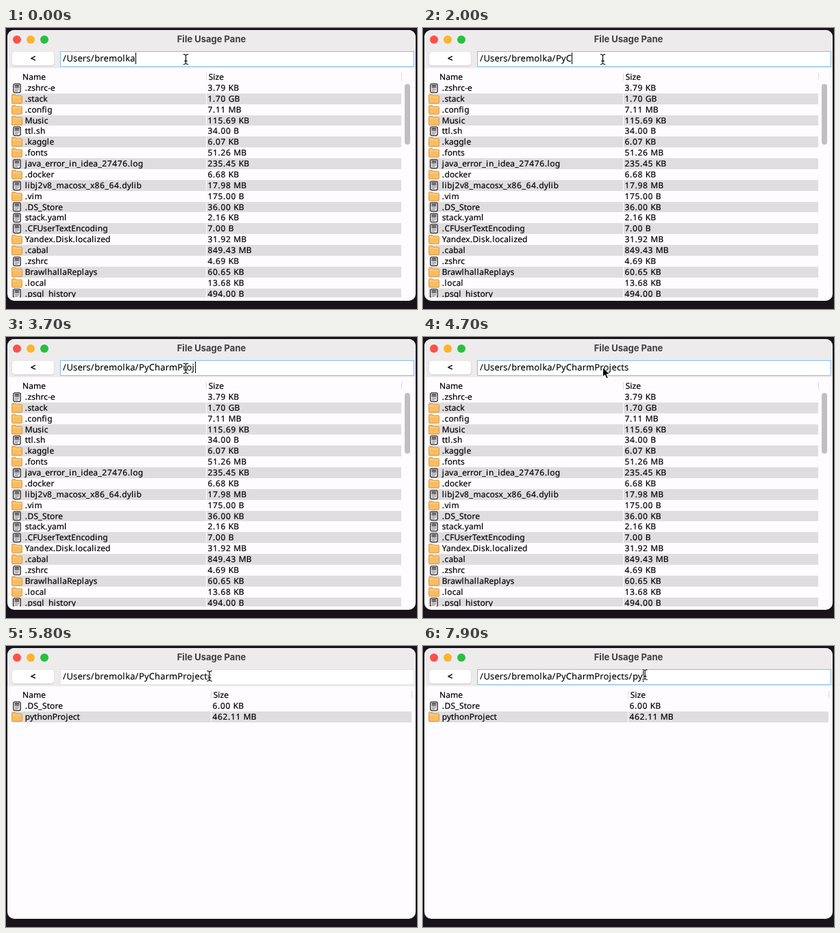
Write an HTML page that moves like this. It is 600 px wide and 412 px high and loops after 8 s.

```html
<!DOCTYPE html>
<html lang="en">
<head>
<meta charset="utf-8">
<title>File Usage Pane</title>
<style>
  html, body { margin: 0; width: 100%; height: 100%; overflow: hidden; background: #19141a; }
  #stage { position: relative; width: 600px; height: 412px; overflow: hidden; }
  #stage * { box-sizing: border-box; }
  #stage div, #stage svg { position: absolute; }
  .win { left: 2px; top: 3px; width: 596px; height: 397px; border-radius: 10px; background: #fefcfe; overflow: hidden; }
  .bar { left: 0; top: 0; width: 596px; height: 56px; background: #eeebed; }
  .title { left: 2px; width: 596px; top: 6px; text-align: center; color: #403d40;
    font: 700 13px/21px Inter, sans-serif; }
  .light { width: 12px; height: 12px; top: 10.5px; border-radius: 50%; }
  .back { left: 9px; top: 35px; width: 61px; height: 20px; border-radius: 4px; background: #fff;
    box-shadow: 0 .5px 1.5px #aaa7aa; text-align: center; }
  .back, .row, .head { font: 12px/15.87px "Noto Sans", sans-serif; }
  .back { line-height: 19px; font-size: 13px; -webkit-text-stroke: .5px #000; }
  .field { left: 79px; top: 34px; width: 517px; height: 23px; padding-left: 3px; background: #fff;
    border: 1px solid #e3e0e3; font: 13px/18px "Noto Sans", sans-serif; white-space: pre; }
  .field.focus { border-color: #84bdf0; }
  .field.off { color: #747174; background: #fbf9fb; }
  .field, .row, .head { letter-spacing: .06px; text-rendering: geometricPrecision; }
  .field { letter-spacing: .1px; -webkit-text-stroke: .1px; }
  .row, .head { -webkit-text-stroke: .2px #000; white-space: pre; color: #000; }
  .thin { letter-spacing: .65px; }
  .caret { position: absolute; width: 1px; height: 17px; top: 1px; background: #000; }
  .table { left: 0; top: 60px; width: 600px; height: 335px; overflow: hidden; }
  .row { left: 8px; height: 15.87px; }
  .row.odd { background: #dfdddf; }
  .name { left: 19.7px; }
  .gap { width: 1px; height: 100%; background: #fefcfe; }
  .rule { top: 6px; width: 1px; height: 11px; background: #dcd9dc; }
  .thumb { left: 582px; top: 22px; width: 8px; height: 89px; border-radius: 4px; background: #c1bfc1; }
  svg { overflow: visible; }
</style>
</head>
<body>
<div id="stage"></div>
<script>
const LOOP = 8000, ROW = 15.87, BLINK = 500;
const stage = document.getElementById('stage');

const HOME = `.zshrc-e|3.79 KB
.stack/|1.70 GB
.config/|7.11 MB
Music/|115.69 KB
ttl.sh|34.00 B
.kaggle/|6.07 KB
.fonts/|51.26 MB
java_error_in_idea_27476.log|235.45 KB
.docker/|6.68 KB
libj2v8_macosx_x86_64.dylib|17.98 MB
.vim/|175.00 B
.DS_Store|36.00 KB
stack.yaml|2.16 KB
.CFUserTextEncoding|7.00 B
Yandex.Disk.localized/|31.92 MB
.cabal/|849.43 MB
.zshrc|4.69 KB
BrawlhallaReplays/|60.65 KB
.local/|13.68 KB
.psql_history|494.00 B`;
const PROJECTS = `.DS_Store|6.00 KB
pythonProject/|--`;

// Keystrokes: time, character
const KEYS = [[1000, '/'], [1300, 'P'], [1600, 'y'], [1900, 'C'], [2100, 'h'], [2300, 'a'], [2500, 'r'],
  [2700, 'm'], [3000, 'P'], [3200, 'r'], [3400, 'o'], [3600, 'j'], [3800, 'e'], [3900, 'c'], [4000, 't'],
  [4100, 's'], [7400, '/'], [7600, 'p'], [7800, 'y']];
const ARROW_AT = 4700, OPEN_AT = 4800, DONE_AT = 5200, FOCUS_AT = 6500;
// Pointer: time, x, y
const PATH = [[0, 262.5, 46], [5600, 262.5, 46], [5900, 314, 43], [6050, 329, 42], [6300, 324, 42], [LOOP, 324, 42]];

function box(cls, parent = stage, html = '', css = '') {
  const el = document.createElement('div');
  el.className = cls;
  el.innerHTML = html;
  el.style.cssText = css;
  parent.append(el);
  return el;
}

// Digits, punctuation and thin letters get a looser fit
const spaced = s => s.replace(/[\d._\/ ijl]+/g, m => `<span class="thin">${m}</span>`);

const FOLDER = `<svg width="16" height="15" style="left:0;top:.9px">
  <path d="M.5 12.2V1.7Q.5.6 1.6.6H5.6L7 2.1H14.3Q15.5 2.1 15.5 3.2V12.2Q15.5 13.4 14.3 13.4H1.7Q.5 13.4 .5 12.2Z"
   fill="#f8bd62" stroke="#d8953c" stroke-width=".9"/><path d="M1.2 4H14.8" stroke="#fbd795" stroke-width="1"/></svg>`;
const FILE = `<svg width="12" height="14" style="left:2px;top:.8px">
  <rect x=".8" y=".8" width="10.4" height="12.8" rx="2" fill="#f4f2f4" stroke="#2a272a" stroke-width="1.3"/>
  <path d="M2.6 3.3H9.4M2.6 5.4H9.4" stroke="#2a272a" stroke-width="1.5"/>
  <path d="M2.8 7.8H9.2M2.8 9.7H9.2M2.8 11.5H7" stroke="#858285" stroke-width="1"/></svg>`;

function table(list, split, right) {
  const el = box('table');
  box('head', el, 'Name', 'left:24px;top:4px');
  box('head', el, 'Size', `left:${split + 2.7}px;top:4px`);
  for (const x of [split - 1, right]) box('rule', el, '', `left:${x}px`);
  list.split('\n').forEach((line, i) => {
    const [name, size] = line.split('|');
    const row = box('row' + (i % 2 ? ' odd' : ''), el, name.endsWith('/') ? FOLDER : FILE,
      `top:${20 + i * ROW}px;width:${right - 8}px`);
    box('name', row, spaced(name.replace('/', '')));
    box('gap', row, '', `left:${split - 9}px`);
    el.last = box('size', row, spaced(size), `left:${split - 6.5}px`);
  });
  return el;
}

const win = box('win');
box('bar', win);
['#fc5048', '#fdb32b', '#27c040'].forEach((c, i) => box('light', stage, '', `left:${9.5 + 20 * i}px;background:${c}`));
box('title', stage, 'File Usage Pane');
box('back', stage, '&lt;');
const field = box('field', stage, '<span></span><span class="caret"></span>');
const [label, caret] = field.children;

const home = table(HOME, 293, 577);
box('thumb', home);
const projects = table(PROJECTS, 300, 592);

stage.insertAdjacentHTML('beforeend', `<svg id="pointer" width="1" height="1" style="left:0;top:0">
  <g id="beam" fill="none" stroke-linecap="round">
    ${[['#fff', 3], ['#111', 1.3]].map(([c, w]) => `<path stroke="${c}" stroke-width="${w}"
      d="M-3.2-7.3Q-.6-7.3 0-5.6Q.6-7.3 3.2-7.3M0-5.6V5.6M-3.2 7.3Q-.6 7.3 0 5.6Q.6 7.3 3.2 7.3M-1.8 2.4H1.8"/>`).join('')}
  </g>
  <path id="arrow" d="M0-1.5V12.5L3.1 9.6L5.3 14.8L7.8 13.7L5.6 8.7H10Z" fill="#000" stroke="#fff" stroke-width="1"/>
</svg>`);
const [pointer, beam, arrow] = ['pointer', 'beam', 'arrow'].map(id => document.getElementById(id));

const show = (el, on) => { el.style.visibility = on ? 'visible' : 'hidden'; };

function pointerAt(t) {
  const i = Math.max(1, PATH.findIndex(p => p[0] > t));
  const [a, b] = [PATH[i - 1], PATH[i]];
  const k = (t - a[0]) / (b[0] - a[0]);
  return [1, 2].map(n => a[n] + (b[n] - a[n]) * k);
}

let shown;
function draw(t) {
  const typed = KEYS.filter(k => k[0] <= t);
  const text = '/Users/bremolka' + typed.map(k => k[1]).join('');
  const opened = t >= OPEN_AT, done = t >= DONE_AT;
  const focus = !opened || t >= FOCUS_AT;
  if (text !== shown) label.innerHTML = spaced(shown = text);
  const lastKey = typed.length ? typed[typed.length - 1][0] : 0;
  const since = t - (opened ? Math.max(lastKey, FOCUS_AT) : lastKey);
  show(caret, focus && since % (2 * BLINK) < BLINK);
  field.className = 'field' + (focus ? ' focus' : done ? '' : ' off');

  show(home, !opened);
  show(projects, opened);
  const size = done ? '462.11 MB' : '--';
  if (projects.last.textContent !== size) projects.last.innerHTML = spaced(size);

  const waiting = t >= ARROW_AT && t < PATH[1][0];
  show(beam, !waiting);
  show(arrow, waiting);
  const [x, y] = pointerAt(t);
  pointer.style.transform = `translate(${x}px,${y}px)`;
}

const start = performance.now();
function tick() {
  draw((performance.now() - start) % LOOP);
  requestAnimationFrame(tick);
}
tick();
</script>
</body>
</html>
```
